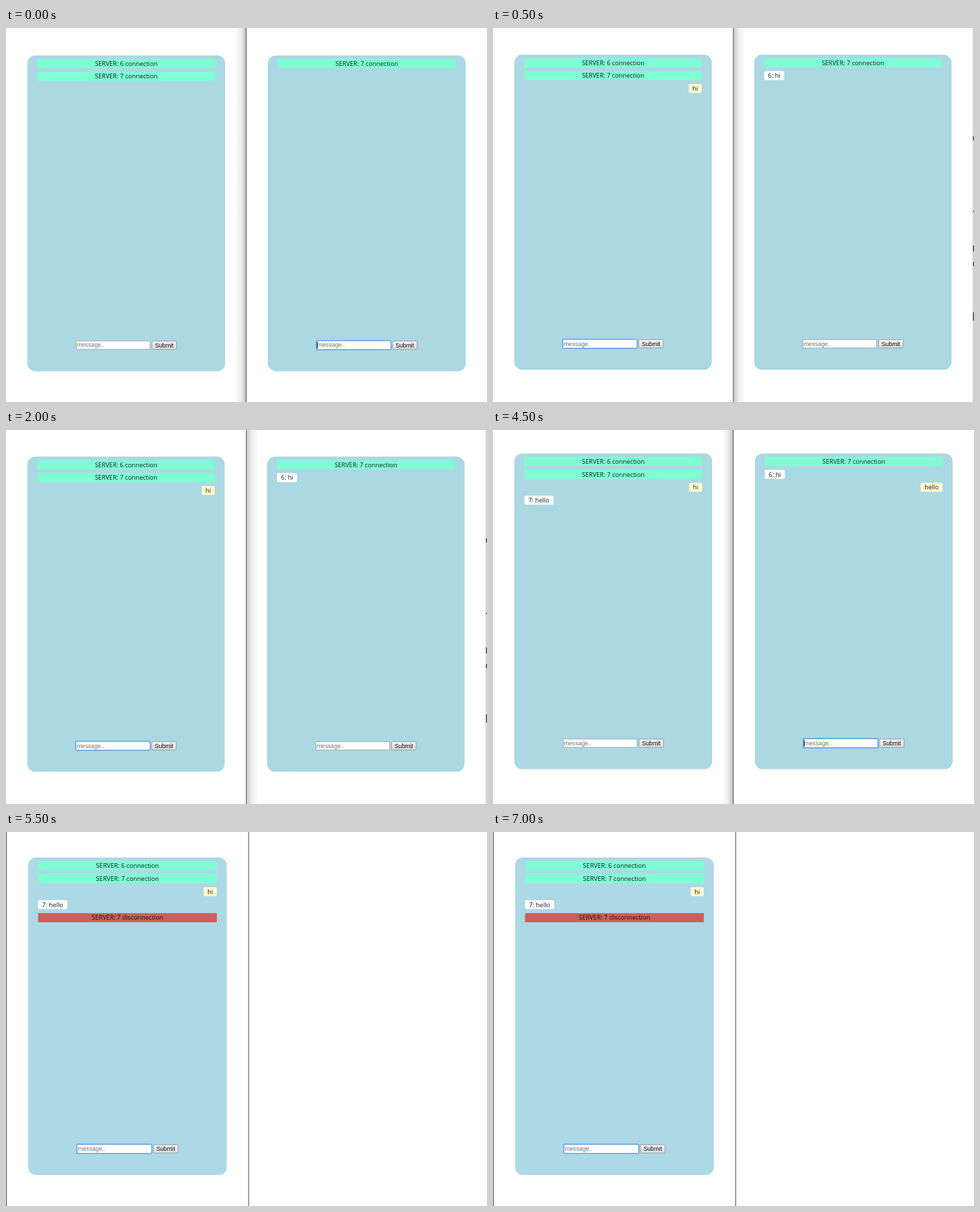
An HTML page that plays this animation: 698x542 px, repeating every 8 s.

```html
<!DOCTYPE html>
<html lang="en">
<head>
<meta charset="utf-8">
<title>Chat demo</title>
<style>
  html, body { margin: 0; width: 100%; height: 100%; overflow: hidden; background: #fefefe; }
  svg { display: block; width: 100vw; height: 100vh; }
  .chat { font: 9.08px "Open Sans", "Noto Sans", sans-serif; fill: #141c1c; }
  .form { font: 8.7px "Liberation Sans", Arial, sans-serif; }
</style>
</head>
<body>
<svg id="stage" viewBox="0 0 698 542" xmlns="http://www.w3.org/2000/svg">
  <defs>
    <linearGradient id="shadeL">
      <stop offset="0" stop-color="#000" stop-opacity="0"/>
      <stop offset=".55" stop-color="#000" stop-opacity=".06"/>
      <stop offset="1" stop-color="#000" stop-opacity=".24"/>
    </linearGradient>
    <linearGradient id="shadeR">
      <stop offset="0" stop-color="#000" stop-opacity=".22"/>
      <stop offset=".45" stop-color="#000" stop-opacity=".06"/>
      <stop offset="1" stop-color="#000" stop-opacity="0"/>
    </linearGradient>
    <linearGradient id="face" x2="0" y2="1">
      <stop offset="0" stop-color="#f5f5f5"/>
      <stop offset="1" stop-color="#dcdcdc"/>
    </linearGradient>
  </defs>
  <g id="view"></g>
</svg>
<script>
const LOOP = 8000;
const PANEL_W = 287;
const BAR = { x: 14.5, w: 258, h: 13 };
const PITCH = 18.75;
const view = document.getElementById('view');

const rect = (x, y, w, h, fill, extra = '') =>
  `<rect x="${x}" y="${y}" width="${w}" height="${h}" fill="${fill}" ${extra}/>`;
const text = (x, y, s, extra = '') => `<text x="${x}" y="${y}" ${extra}>${s}</text>`;

// Message kinds
const notice = color => s => y =>
  rect(BAR.x, y, BAR.w, BAR.h, color) +
  text(BAR.x + BAR.w / 2, y + 9.8, s, 'text-anchor="middle"');
const joined = id => notice('#7fffd4')(`SERVER: ${id} connection`);
const left = id => notice('#cd5c5c')(`SERVER: ${id} disconnection`);
const bubble = (x, w, color, s) => y =>
  rect(x, y, w, BAR.h, color, 'rx="2.2"') +
  text(x + w / 2, y + 9.8, s, 'text-anchor="middle"');
const mine = (s, w) => bubble(BAR.x + BAR.w - w, w, '#fffacd', s);
const theirs = (s, w) => bubble(BAR.x, w, '#fff', s);

function form(focus, caret) {
  const y = 413.5;
  const ring = focus
    ? rect(70.4, y - .1, 108.2, 13.2, '#fff', 'rx="1" stroke="#5b9ce0" stroke-width="1.4"')
    : rect(71, y + .5, 107, 12, '#fff', 'stroke="#a3a9ab" stroke-width=".9"');
  return `<g class="form">${ring}` +
    text(71.8, y + 9.3, 'message..', 'fill="#757575"') +
    (caret ? rect(71.2, y + 1.5, 1, 10, '#111') : '') +
    rect(181, y + .5, 35.5, 12, 'url(#face)', 'rx="1" stroke="#989898" stroke-width=".9"') +
    text(198.7, y + 9.4, 'Submit', 'text-anchor="middle" fill="#111"') + '</g>';
}

function chat({ x, y, w = PANEL_W, color = '#abd8e2', focus, caret }, rows) {
  return `<g class="chat" transform="translate(${x} ${y}) scale(${w / PANEL_W})">` +
    rect(0, 0, PANEL_W, 457.7, color, 'rx="11.5"') +
    rows.map((row, i) => row(5.2 + i * PITCH)).join('') +
    form(focus, caret) + '</g>';
}

const edge = (x, color = '#666') => rect(x, 0, 1.2, 542, color);
const shadeLeft = rect(332, 0, 16, 542, 'url(#shadeL)') + edge(348);
const shadeRight = rect(349, 0, 17, 542, 'url(#shadeR)') + edge(348, '#777');

// Sliver of a window behind the right border
const sliver = rect(696.4, 0, .9, 542, '#a6a6a6') +
  [[157, 6], [265, 1.5], [315, 9], [339, 6], [412, 12]]
    .map(([y, h]) => rect(696.5, y, 1.5, h, '#555')).join('');

const hi = mine('hi', 19), hiFrom = theirs('6: hi', 29);
const hello = mine('hello', 32), helloFrom = theirs('7: hello', 42);
const start = [joined(6), joined(7)];

const scenes = [
  { at: 0, art: shadeLeft +
      chat({ x: 31, y: 39.7 }, start) +
      chat({ x: 380, y: 39.7, focus: true, caret: true }, [joined(7)]) },
  { at: 500, art: shadeRight + sliver +
      chat({ x: 31, y: 38.6, w: 286.4, focus: true }, [...start, hi]) +
      chat({ x: 379, y: 38.6, w: 286.4 }, [joined(7), hiFrom]) },
  { at: 3000, art: shadeLeft +
      chat({ x: 31, y: 33.9 }, [...start, hi, helloFrom]) +
      chat({ x: 380, y: 33.9, focus: true, caret: true }, [joined(7), hiFrom, hello]) },
  { at: 5500, art: edge(0) + edge(351.5) +
      chat({ x: 32, y: 37, w: 288.5, color: '#add8e6', focus: true },
        [...start, hi, helloFrom, left(7)]) }
];

let shown = null;
function draw(now) {
  const t = now % LOOP;
  const scene = scenes.filter(s => s.at <= t).pop();
  if (scene !== shown) view.innerHTML = (shown = scene).art;
}

const origin = performance.now();
function tick() {
  draw(performance.now() - origin);
  requestAnimationFrame(tick);
}
tick();
</script>
</body>
</html>
```
